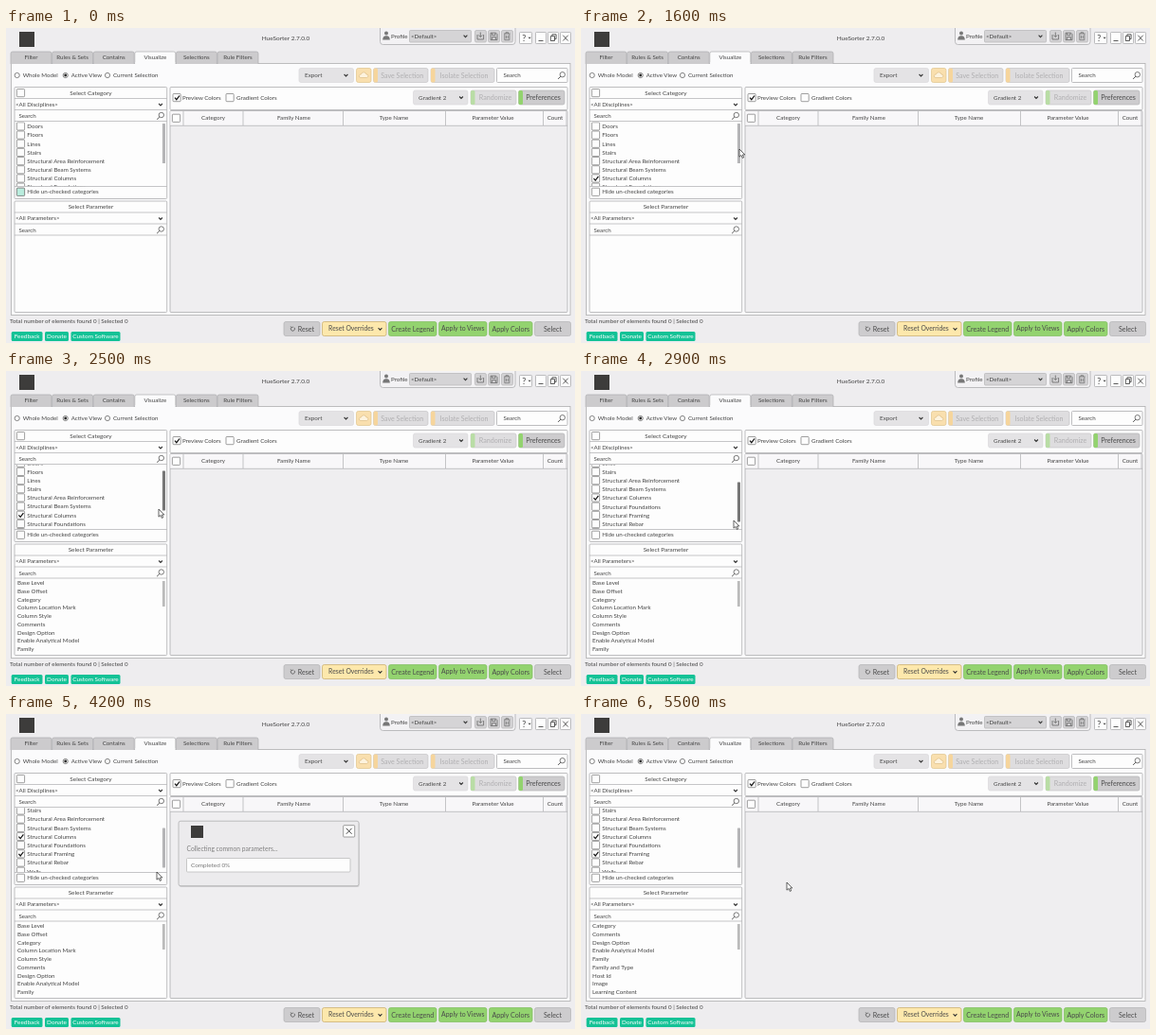
Animation of 600 by 333 pixels, one loop 6000 ms. Source, as an HTML page:

```html
<!DOCTYPE html>
<html lang="en">
<head>
<meta charset="utf-8">
<title>Filter window</title>
<style>
html, body { margin: 0; width: 100%; height: 100%; overflow: hidden; background: #eeedef; }
svg { display: block; width: 100vw; height: 100vh; }
text { font-family: Lato, "Open Sans", sans-serif; white-space: pre; }
</style>
</head>
<body>
<svg id="stage" viewBox="0 0 600 333" xmlns="http://www.w3.org/2000/svg"></svg>
<script>
const LOOP = 6000, STEP = 100, ROW = 9.18, PARAM_ROW = 8.72;
const INK = '#444', LINE = '#aeaeb0', WHITE = '#fdfdfd', GREEN = '#93d36f', TEAL = '#b9ecdd';

const rect = (x, y, w, h, fill, stroke = 'none', r = 0, sw = .8) =>
  `<rect x="${x}" y="${y}" width="${w}" height="${h}" rx="${r}" fill="${fill}" stroke="${stroke}" stroke-width="${sw}"/>`;
const path = (d, stroke = INK, sw = .8, fill = 'none') =>
  `<path d="${d}" fill="${fill}" stroke="${stroke}" stroke-width="${sw}"/>`;
// y is the middle of the capitals
const text = (x, y, s, { size = 6.2, fill = INK, anchor = 'start' } = {}) =>
  `<text x="${x}" y="${y + size * .36}" font-size="${size}" fill="${fill}" text-anchor="${anchor}">${
    s.replace(/&/g, '&amp;').replace(/</g, '&lt;')}</text>`;
const mid = (x, y, s, o = {}) => text(x, y, s, { ...o, anchor: 'middle' });
const circle = (x, y, r, fill, stroke = 'none', sw = .7) =>
  `<circle cx="${x}" cy="${y}" r="${r}" fill="${fill}" stroke="${stroke}" stroke-width="${sw}"/>`;
const chevron = (x, y) => path(`M${x - 1.9} ${y - 1}l1.9 1.9l1.9 -1.9`, '#333', 1.1);
const lens = (x, y) => circle(x + .8, y - .8, 2.7, 'none', '#444', .7) + path(`M${x - 1.2} ${y + 1.2}l-2.7 2.7`, '#444', .9);
const tick = (x, y) => path(`M${x + 2} ${y + 4.2}l1.8 2l3.2 -4.2`, '#111', 1.2);
const box = (x, y, fill = WHITE) => rect(x, y, 8.2, 8.2, fill, '#777', .8, .7);
const hline = (x1, x2, y) => path(`M${x1} ${y}H${x2}`, LINE, .7);

function button(x, y, w, h, label, o = {}) {
  const { fill = '#cdccce', stroke = '#b3b3b5', stripe, ink = '#4a4a4a', size = 7.1, dx = 0 } = o;
  return rect(x, y, w, h, fill, stroke, 2, .7) +
    (stripe ? rect(x, y, 4.5, h, stripe, 'none', 1.5) : '') +
    mid(x + w / 2 + dx, y + h / 2, label, { size, fill: ink });
}

function radio(x, label, on) {
  return circle(x, 50, 2.6, WHITE, '#555') + (on ? circle(x, 50, 1.4, '#222') : '') + text(x + 6, 50, label);
}

function titleBar() {
  let s = rect(14, 4, 16, 16, '#3d3c3b') + mid(295, 10.3, 'HueSorter 2.7.0.0', { size: 6.5 });
  s += path('M394.5 0V14.5q0 3 3 3H534q3 0 3 -3V0', LINE, .8, '#f3f2f4');
  s += circle(401, 5.6, 2, '#777') + path('M397.2 12.6q0 -4.4 3.8 -4.4t3.8 4.4z', 'none', 0, '#777');
  s += text(406, 8.7, 'Profile') + rect(425.5, 2.5, 65, 12.5, '#d5d4d6', '#b5b5b7', 1, .7);
  s += text(427, 8.5, '<Default>') + chevron(484.5, 8.7);
  for (const x of [494.5, 508.5, 522.5]) s += rect(x, 2.5, 12, 12.5, '#d3d2d4', '#b5b5b7', 1.5, .7);
  s += path('M497 7v5h6.6v-5M500.3 4.5v5m-2 -2l2 2l2 -2', '#666');
  s += path('M511 5.2h5.6l1.4 1.4v6h-7zM512.6 5.2v2.4h3.4v-2.4M512.6 12.4v-2.8h3.8v2.8', '#666');
  s += path('M525 6h6.6M527 6v-1.3h2.6v1.3M525.8 6.4v6.3h5v-6.3M527.4 8v3.2M529.2 8v3.2', '#666', .7);
  for (const [x, w] of [[541.5, 13], [558.5, 11], [571.5, 11], [584.5, 11]]) s += rect(x, 4.5, w, 12, WHITE, '#a4a4a6', .8, .7);
  s += mid(546.3, 10.4, '?', { size: 9 }) + path('M550.5 9.7h3.2l-1.6 1.8z', 'none', 0, INK);
  s += path('M561.5 13.5h5M574.3 8.7h4.2v4.8h-4.2zM575.9 8.5v-1.7h4.2v4.8h-1.5M587.3 7.7l5.4 5.8m0 -5.8l-5.4 5.8', '#333', .8);
  return s;
}

function tabs() {
  const names = ['Filter', 'Rules & Sets', 'Contains', 'Visualize', 'Selections', 'Rule Filters'];
  const bars = names.map((n, i) => {
    const x = 5 + i * 43.6, on = i === 3;
    return path(`M${x} 38V27q0 -2 2 -2H${x + 41}q2 0 2 2V38`, LINE, .7, on ? '#fbfbfc' : '#cccbcd') +
      mid(x + 21.5, 30.8, n);
  }).join('');
  return rect(5.5, 37.5, 589.5, 266, '#fbfbfc', LINE) + bars + rect(136.3, 36, 42, 3, '#fbfbfc');
}

function toolRow() {
  const combo = { fill: '#e4e3e5', stroke: '#dad9db', size: 6.3 };
  const dim = { fill: '#dedddf', stroke: '#c6c5c7', ink: '#b0afb1', stripe: '#f6d59c', dx: 1.5 };
  return radio(11.7, 'Whole Model') + radio(62.7, 'Active View', true) + radio(107, 'Current Selection') +
    button(309, 42.5, 57.5, 15, 'Export', { ...combo, dx: -13.5 }) + chevron(358.5, 50) +
    rect(369.5, 42.5, 15.5, 15, '#f9dfae', '#e0c48d', 2, .7) +
    path('M374 52.5q-2 -.3 -1.6 -2.2q.5 -1.4 2 -1.3q.7 -2.4 3.1 -2.2q2 .2 2.4 2.1q2.2 .1 2.1 2q-.2 1.5 -1.7 1.6z', '#d9b87c', .6, '#fdf3de') +
    button(387.5, 42.5, 57.5, 15, 'Save Selection', dim) +
    button(448, 42.5, 67, 15, 'Isolate Selection', dim) +
    rect(517.5, 42.5, 74.5, 15, WHITE, LINE, 1) + text(524.5, 50.2, 'Search') + lens(586, 50) +
    button(429.5, 66, 57.5, 15, 'Gradient 2', { ...combo, dx: -8.5 }) + chevron(480, 73.5) +
    button(490, 66, 48, 15, 'Randomize', { ...dim, stripe: '#b9dda5', dx: 2 }) +
    button(540.5, 66, 48.5, 15, 'Preferences', { stripe: GREEN, dx: 1.8 });
}

function sidePanel(y, h, title, combo) {
  return rect(9, y, 160.7, h, WHITE, LINE, 1) + mid(89.5, y + 5.7, title, { size: 6.4 }) +
    hline(9, 169.7, y + 12) + text(10, y + 18.2, combo) + chevron(163, y + 18.5) +
    hline(9, 169.7, y + 24) + text(13.5, y + 30.3, 'Search') + lens(163, y + 30.3) + hline(9, 169.7, y + 36);
}

function tablePanel() {
  let s = rect(173, 62.5, 419, 24, WHITE, LINE, 1) + box(176, 69.5) + tick(176, 69.5) + text(186, 73.4, 'Preview Colors');
  s += box(232, 69.5) + text(243, 73.4, 'Gradient Colors');
  s += rect(173, 87.5, 419, 213, '#efeef0', LINE, 1) + rect(173.4, 88, 418.2, 15, '#f8f7f9') + hline(173, 592, 103.3);
  s += box(175.4, 91.2);
  for (const x of [187, 250, 355.5, 463.5, 566.5, 591]) s += path(`M${x} 88V103`, LINE, .7);
  for (const [x, n] of [[218.5, 'Category'], [303.5, 'Family Name'], [409, 'Type Name'], [513.5, 'Parameter Value'], [579, 'Count']])
    s += mid(x, 95, n);
  return s;
}

function footer() {
  const green = { fill: GREEN, stroke: '#7fbd5d' };
  let s = text(4, 310, 'Total number of elements found 0 | Selected 0');
  for (const [x, w, n] of [[5.7, 32.8, 'Feedback'], [41, 25, 'Donate'], [68.5, 52, 'Custom Software']])
    s += rect(x, 321, w, 10, '#13c296', 'none', 1.5) + mid(x + w / 2, 325.9, n, { size: 6.4, fill: '#fff' });
  s += button(293, 310.5, 38, 15, 'Reset', { dx: 4.5 });
  s += path('M301.1 316.4a2.1 2.1 0 1 0 2.8 .2M300.2 315.4l1.1 1.4l1.5 -.9', INK, .7);
  s += button(333.5, 310.5, 67.5, 15, 'Reset Overrides', { fill: '#fde8ac', stroke: '#c8ab68', size: 6.8, dx: -3.3 }) + chevron(394.5, 318.2);
  s += button(403.5, 310.5, 50.5, 15, 'Create Legend', green);
  s += button(456.5, 310.5, 50.5, 15, 'Apply to Views', { ...green, size: 6.9 });
  s += button(509.5, 310.5, 45.5, 15, 'Apply Colors', green);
  return s + button(557.5, 310.5, 38, 15, 'Select');
}

const CATEGORIES = ['Doors', 'Floors', 'Lines', 'Stairs', 'Structural Area Reinforcement', 'Structural Beam Systems',
  'Structural Columns', 'Structural Foundations', 'Structural Framing', 'Structural Rebar', 'Walls'];
const COLUMN_PARAMS = ['Base Level', 'Base Offset', 'Category', 'Column Location Mark', 'Column Style', 'Comments',
  'Design Option', 'Enable Analytical Model', 'Family'];
const COMMON_PARAMS = ['Category', 'Comments', 'Design Option', 'Enable Analytical Model', 'Family', 'Family and Type',
  'Host Id', 'Image', 'Learning Content'];

const rowY = i => 104 + i * ROW;
const categoryRow = (n, i) => box(11.4, rowY(i) - 4.2) + text(22.3, rowY(i), n);
const check = (id, i) => `<g id="${id}">${tick(11.4, rowY(i) - 4.2)}</g>`;
const paramList = (id, names) =>
  `<g id="${id}">${names.map((n, i) => text(12, 224 + i * PARAM_ROW, n)).join('')}</g>`;

function dialog() {
  return '<g id="dialog">' + rect(182.6, 114, 190, 69, '#0002', 'none', 2) +
    rect(182, 113.2, 190, 68.5, '#ecebed', '#b0b0b2', 2) + rect(195, 118, 13, 13, '#3d3c3b') +
    rect(355.7, 117.7, 12, 12.3, WHITE, '#777', .8, .7) + path('M358.8 120.8l5.8 6m0 -6l-5.8 6', '#333', .9) +
    text(190.5, 142.5, 'Collecting common parameters...', { size: 6.7, fill: '#808080' }) +
    rect(190.5, 152.5, 172.5, 14.5, WHITE, '#bbb', 1) + text(195, 159.7, 'Completed 0%', { size: 6.4, fill: '#777' }) + '</g>';
}

const stage = document.getElementById('stage');
stage.innerHTML =
  '<defs><clipPath id="listClip"><rect x="9.5" y="99.2" width="159.5" height="68"/></clipPath></defs>' +
  rect(0, 0, 600, 333, '#eeedef') + titleBar() + tabs() +
  sidePanel(62.5, 118, 'Select Category', '<All Disciplines>') + box(11.4, 64.5) +
  `<g clip-path="url(#listClip)"><g id="list">${CATEGORIES.map(categoryRow).join('')}` +
  `<g id="hover">${box(11.4, rowY(6) - 4.2, TEAL)}</g>${check('columns', 6)}${check('framing', 8)}</g></g>` +
  rect(164.9, 101, 3.1, 42, '#bbb', 'none', .6).replace('<rect', '<rect id="thumb"') +
  hline(9, 169.7, 167.5) + box(11.4, 169.2) + `<g id="hideHover">${box(11.4, 169.2, TEAL)}</g>` +
  text(22.3, 173.2, 'Hide un-checked categories') +
  sidePanel(183, 117.5, 'Select Parameter', '<All Parameters>') +
  paramList('columnParams', COLUMN_PARAMS) + paramList('commonParams', COMMON_PARAMS) +
  `<g id="paramThumb">${rect(164.9, 222, 2.8, 27, '#bbb', 'none', .6)}</g>` +
  tablePanel() + toolRow() + footer() + dialog() +
  `<g id="cursor">${path('M0 0V8.2L1.9 6.5L3.3 9.4L4.7 8.8L3.4 6H5.8Z', '#222', .7, '#fff')}</g>`;

const part = id => document.getElementById(id);
const show = (id, on) => part(id).setAttribute('display', on ? 'inline' : 'none');
const between = (t, a, b) => t >= a && t < b;

// Keys are [time, ...values], joined by straight lines
function follow(keys, t) {
  let i = 0;
  while (i < keys.length - 2 && t >= keys[i + 1][0]) i++;
  const a = keys[i], b = keys[i + 1];
  const k = Math.min(1, Math.max(0, (t - a[0]) / (b[0] - a[0])));
  return a.slice(1).map((v, j) => v + (b[j + 1] - v) * k);
}

const POINTER = [[100, 17, 170], [400, 16, 159], [700, 16, 159], [800, 152, 132], [1300, 167, 128], [1700, 167, 128],
  [2200, 166, 141], [2500, 161, 146], [3000, 161, 161], [3300, 161, 161], [3400, 27, 148], [3700, 16, 148],
  [4000, 16, 148], [4200, 159, 167], [4700, 216, 177], [4800, 217, 178]];
const SCROLL = [[2300, 0], [2500, 6.7], [3000, 29.5]];

function draw(now) {
  const t = Math.floor((now % LOOP) / STEP) * STEP;
  const [x, y] = follow(POINTER, t), [scroll] = follow(SCROLL, t);
  part('cursor').setAttribute('transform', `translate(${x} ${y})`);
  part('list').setAttribute('transform', `translate(0 ${-scroll})`);
  part('thumb').setAttribute('y', 101 + scroll * .66);
  part('thumb').setAttribute('fill', between(t, 2200, 3200) ? '#777' : '#b5b5b7');
  show('cursor', t >= 100);
  show('hideHover', t < 200);
  show('hover', between(t, 200, 900));
  show('columns', t >= 900);
  show('framing', t >= 3800);
  show('dialog', between(t, 1700, 2300) || between(t, 4100, 5000));
  show('columnParams', between(t, 2400, 5100));
  show('commonParams', t >= 5100);
  show('paramThumb', t >= 2400);
}

function tickFrame() {
  draw(performance.now());
  requestAnimationFrame(tickFrame);
}
tickFrame();
</script>
</body>
</html>
```
